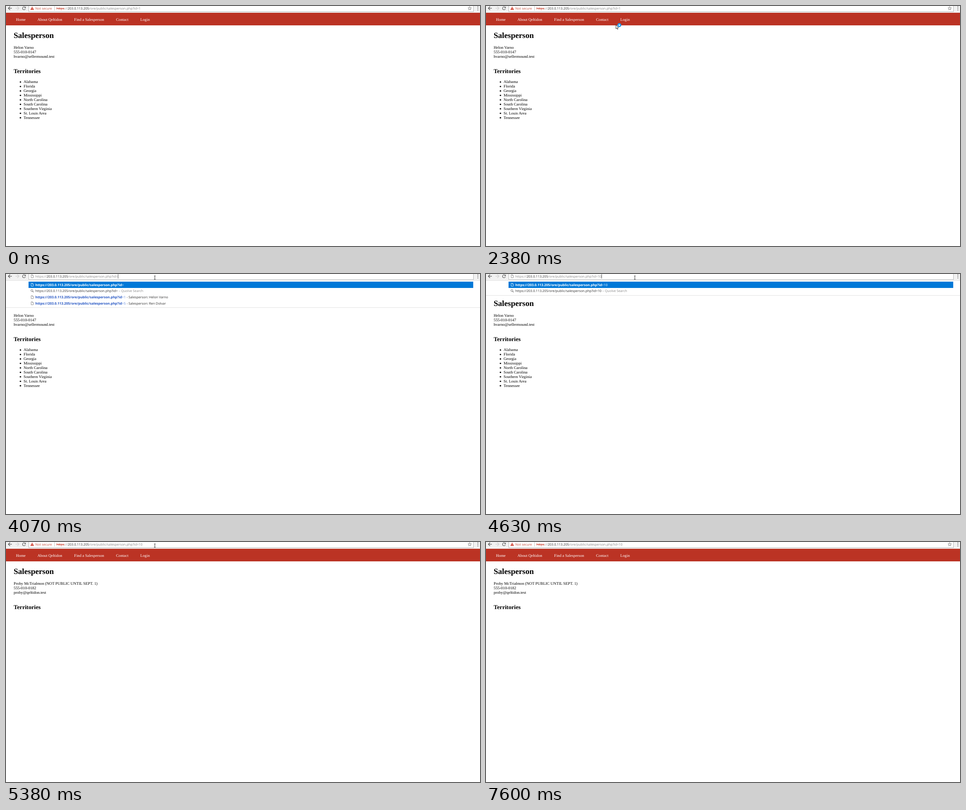
Recreate the animation shown at these times as an HTML page with a canvas. Size 1051 px wide and 533 px high, loop 8.53 s.

```html
<!DOCTYPE html>
<html lang="en">
<head>
<meta charset="utf-8">
<title>Salesperson</title>
<style>
  html, body { margin: 0; width: 100%; height: 100%; overflow: hidden; background: #fff; }
  canvas { display: block; }
</style>
</head>
<body>
<canvas id="stage" width="1051" height="533"></canvas>
<script>
const ctx = document.getElementById('stage').getContext('2d');
const W = 1051, H = 533, LOOP = 8530;
const SERIF = '"Liberation Serif", "Times New Roman", serif';
const SANS = '"Open Sans", "Noto Sans", sans-serif';
const UI = `7.32px ${SANS}`;
const UI_BOLD = `bold 7.45px ${SANS}`;
const BODY = `8.8px ${SERIF}`;
const HOST = '203.0.113.205';
const PATH = '/ore/public/salesperson.php?id=';
const BASE = 'https://' + HOST + PATH;

const people = {
  first: {
    lines: ['Helon Varno', '555-010-0147', 'hvarno@sellermound.test'],
    areas: ['Alabama', 'Florida', 'Georgia', 'Mississippi', 'North Carolina',
      'South Carolina', 'Southern Virginia', 'St. Louis Area', 'Tennessee']
  },
  hidden: {
    lines: ['Proby McTrialmon (NOT PUBLIC UNTIL SEPT. 1)', '555-010-0182', 'proby@qeltidon.test'],
    areas: []
  }
};

// Pointer strokes: the position is refreshed n times between start and end.
const strokes = [
  { start: 170, end: 430, n: 4, busy: true, pts: [[760, 429], [420, 262], [108, 158], [127, 149]] },
  { start: 610, end: 1460, n: 10, busy: true, pts: [[150, 138], [235, 78], [302, 43], [262, 92], [210.5, 137.5]] },
  { start: 1560, end: 2380, n: 10, busy: true, pts: [[200, 132], [173, 108], [205, 78], [255, 54], [288, 42]] },
  { start: 2480, end: 2860, n: 5, busy: true, pts: [[296, 37], [310, 25], [321, 15], [330, 8], [330, 8]] },
  { start: 6200, end: 6400, n: 3, pts: [[306, 80], [289, 205], [314, 276]] },
  { start: 6660, end: 7500, n: 10, pts: [[330, 266], [420, 259], [590, 300], [770, 405], [924, 532]] }
];

function rect(x, y, w, h, color) {
  ctx.fillStyle = color;
  ctx.fillRect(x, y, w, h);
}

// Draws text and returns the x where it ends.
function text(str, x, y, font, color) {
  ctx.font = font;
  ctx.fillStyle = color;
  ctx.fillText(str, x, y);
  return x + ctx.measureText(str).width;
}

function line(pts, color, width = 1, close = false, fill = null) {
  ctx.beginPath();
  pts.forEach(([x, y]) => ctx.lineTo(x, y));
  if (close) ctx.closePath();
  if (fill) { ctx.fillStyle = fill; ctx.fill(); }
  if (width) {
    ctx.strokeStyle = color;
    ctx.lineWidth = width;
    ctx.stroke();
  }
}

function dot(x, y, r, color) {
  ctx.beginPath();
  ctx.arc(x, y, r, 0, Math.PI * 2);
  ctx.fillStyle = color;
  ctx.fill();
}

function ring(x, y, r, color, width, from = 0, to = Math.PI * 2) {
  ctx.beginPath();
  ctx.arc(x, y, r, from, to);
  ctx.strokeStyle = color;
  ctx.lineWidth = width;
  ctx.stroke();
}

function arrowIcon(x, dir, color) {
  line([[x - 4 * dir, 5], [x + 4 * dir, 5]], color, 1.2);
  line([[x, 1.2], [x + 4 * dir, 5], [x, 8.8]], color, 1.2);
}

function pageIcon(y, color) {
  line([[55.8, y - 3.2], [58.8, y - 3.2], [60.6, y - 1.4], [60.6, y + 3.3], [55.8, y + 3.3]], color, 0.8, true);
  line([[58.6, y - 3], [58.6, y - 1.2], [60.5, y - 1.2]], color, 0.6);
}

function reloadIcon(loading) {
  const c = '#555';
  if (loading) {
    line([[37, 2], [43, 8]], c, 1.2);
    line([[43, 2], [37, 8]], c, 1.2);
    return;
  }
  ring(40, 5, 3.3, c, 1.1, 0.35, 5.5);
  line([[43.8, 1.2], [43.8, 4.6], [40.4, 4.6]], c, 0, true, c);
}

function starIcon() {
  const pts = [];
  for (let i = 0; i < 10; i++) {
    const a = -Math.PI / 2 + i * Math.PI / 5, r = i % 2 ? 1.8 : 4;
    pts.push([1028.3 + r * Math.cos(a), 5.3 + r * Math.sin(a)]);
  }
  line(pts, '#666', 0.8, true);
}

function caret(x) {
  rect(Math.round(x), 0.5, 0.8, 9.5, '#333');
}

function addressBar(t) {
  const editing = t >= 4070 && t < 5180;
  const focused = t >= 3510 && t < 4900;
  const selected = t >= 2860 && t < 3510;
  const id = t < 4070 ? '1' : t < 4530 ? '' : t < 4630 ? '1' : '10';

  rect(0, 0, W, 15, '#f2f2f2');
  rect(50, 0, 987, 13, '#b9b9b9');
  rect(51, 0, 985, 12, '#fff');
  arrowIcon(9, -1, '#555');
  arrowIcon(25, 1, '#d2d2d2');
  reloadIcon(t >= 4900 && t < 5380);
  [2, 5.4, 8.8].forEach(y => dot(1046.3, y, 0.9, '#555'));
  if (t < 4070 || t >= 4900) starIcon();

  let x = 65;
  if (editing) {
    pageIcon(5, '#777');
    x = text('https://', x, 7.9, UI, '#888');
  } else {
    line([[58, 1.3], [62, 8.5], [54, 8.5]], '#cf3a28', 0, true, '#cf3a28');
    rect(57.6, 3.6, 0.9, 2.5, '#fff');
    rect(57.6, 6.8, 0.9, 0.9, '#fff');
    text('Not secure', 65, 7.9, UI, '#c4513f');
    rect(107, 0.5, 0.8, 9.5, '#bbb');
    if (selected) rect(111, 0, 188.5, 10, '#0078d7');
    const c = selected ? '#fff' : '#c9402f';
    x = text('https', 111.7, 7.9, UI, c);
    rect(111.7, 5, x - 111.7, 0.8, c);
    x = text('://', x, 7.9, UI, selected ? '#fff' : '#888');
  }
  x = text(HOST, x, 7.9, UI, selected ? '#fff' : '#333');
  x = text(PATH + id, x, 7.9, UI, selected ? '#fff' : '#888');
  if (focused) caret(x);
}

function page(person) {
  rect(0, 15, W, 28, '#bb3324');
  [['Home', 22], ['About Qeltidon', 69.7], ['Find a Salesperson', 151], ['Contact', 244], ['Login', 297.8]]
    .forEach(([label, x]) => text(label, x, 32.7, BODY, '#fff'));
  text('Salesperson', 17, 70.7, `bold 17.6px ${SERIF}`, '#000');
  person.lines.forEach((s, i) => text(s, 17, 94.8 + i * 9.95, BODY, '#000'));
  text('Territories', 17, 149.2, `bold 13.1px ${SERIF}`, '#000');
  person.areas.forEach((s, i) => {
    const y = 171.2 + i * 9.92;
    dot(32, y - 2.4, 1.55, '#000');
    text(s, 39, y, BODY, '#000');
  });
}

function historyRow(y, id, title, on) {
  const main = on ? '#fff' : '#2455c3';
  pageIcon(y, on ? '#fff' : '#777');
  let x = text(BASE.slice(0, -1), 65, y + 2.7, UI_BOLD, main);
  x = text('=' + id, x, y + 2.7, UI, on ? '#fff' : '#5c86dd');
  if (title) text('- Salesperson: ' + title, x + 2, y + 2.7, UI, on ? '#fff' : '#333');
}

function suggestions(t) {
  if (t < 4070 || t >= 4810) return;
  const id = t < 4530 ? '' : t < 4630 ? '1' : '10';
  const bottom = id ? 47 : 74;
  rect(0, 14, W, bottom - 14, '#fff');
  rect(0, 14, W, 0.8, '#dcdcdc');
  rect(0, bottom, W, 1, '#e2e2e2');
  rect(50, 17, 986, 14, '#0078d7');
  historyRow(23.8, id, id === '1' ? people.first.lines[0] : '', true);
  ring(57.4, 36.7, 2.2, '#666', 0.9);
  line([[59, 38.3], [61.2, 40.5]], '#666', 1.1);
  const x = text(BASE + id, 65, 40.3, UI, '#333');
  text('– Quolve Search', x + 2, 40.3, UI, '#8a8a8a');
  if (!id) {
    historyRow(51.3, '1', people.first.lines[0]);
    historyRow(65, '5', 'Ren Dolvar');
  }
}

function along(pts, u) {
  const p = u * (pts.length - 1), i = Math.min(Math.floor(p), pts.length - 2), f = p - i;
  return [0, 1].map(k => pts[i][k] + (pts[i + 1][k] - pts[i][k]) * f);
}

function arrow(x, y, busy) {
  const shape = [[0, 0], [0, 8.6], [2, 6.8], [3.4, 9.9], [4.7, 9.3], [3.4, 6.3], [6, 6.1]];
  line(shape.map(([a, b]) => [x + a, y + b]), '#111', 0.8, true, '#fff');
  if (busy) {
    dot(x + 7.6, y + 0.5, 4.4, '#2196e8');
    dot(x + 7.6, y + 0.5, 1.7, '#e4f4ff');
  }
}

function beam(x, y) {
  line([[x - 1.8, y - 3.8], [x + 1.8, y - 3.8]], '#222', 0.8);
  line([[x, y - 3.8], [x, y + 4]], '#222', 0.9);
  line([[x - 1.8, y + 4], [x + 1.8, y + 4]], '#222', 0.8);
}

function pointer(t) {
  if (t < 170 || t >= 7600) return;
  const s = strokes.filter(k => k.start <= t).pop();
  const gap = (s.end - s.start) / (s.n - 1);
  const step = Math.min(s.n - 1, Math.floor((t - s.start) / gap + 0.01));
  const [x, y] = along(s.pts, step / (s.n - 1));
  if (y < 13) beam(x, y);
  else arrow(x, y, s.busy);
}

function draw(t) {
  rect(0, 0, W, H, '#fff');
  page(t < 5280 ? people.first : people.hidden);
  addressBar(t);
  suggestions(t);
  pointer(t);
}

ctx.textRendering = 'geometricPrecision';
const begin = performance.now();
function tick() {
  draw((performance.now() - begin) % LOOP);
  requestAnimationFrame(tick);
}
tick();
</script>
</body>
</html>
```
